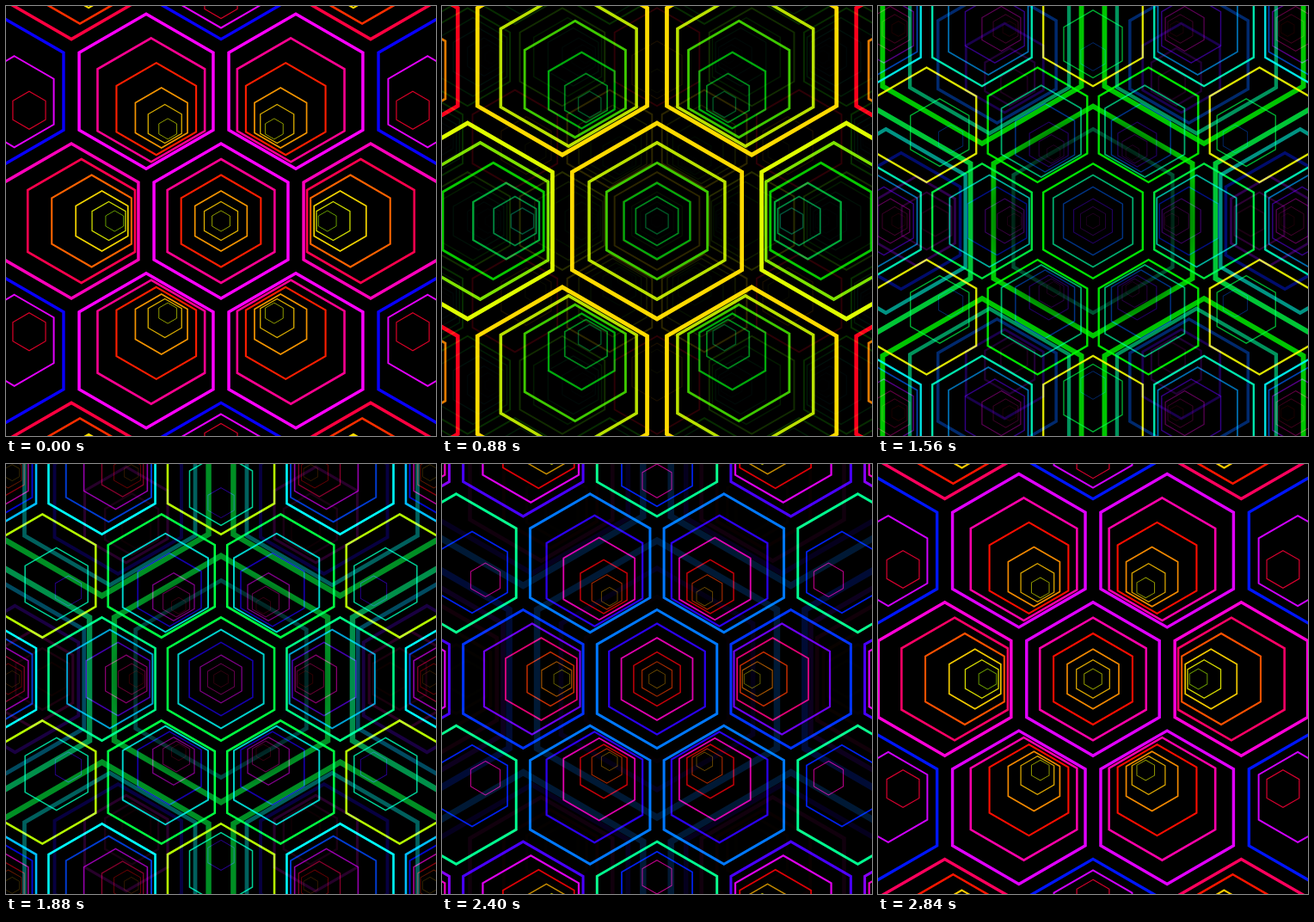
An HTML page with a canvas for the animation above (2.88 s loop, 500 by 500 pixels).

```html
<!DOCTYPE html>
<html lang="en">
<head>
<meta charset="utf-8">
<title>Hexagon tunnel</title>
<style>
html, body { margin: 0; width: 100%; height: 100%; overflow: hidden; background: #000; }
canvas { display: block; width: 500px; height: 500px; }
</style>
</head>
<body>
<canvas id="stage" width="500" height="500"></canvas>
<script>
const ctx = document.getElementById('stage').getContext('2d');
const LOOP = 2880, STEP = 40, SPACING = 174, ROOT3 = Math.sqrt(3);

// Nested rings of one cell, from the rim inwards.
const RINGS = [
  { r: 90, line: 3.5, alpha: 1, hue: 0 },
  { r: 72, line: 2.6, alpha: 1, hue: 30 },
  { r: 53.5, line: 2.1, alpha: 1, hue: 78 },
  { r: 35, line: 1.7, alpha: 0.95, hue: 112 },
  { r: 22.5, line: 1.3, alpha: 0.85, hue: 125 },
  { r: 12, line: 1, alpha: 0.6, hue: 145 }
];
const SPARSE_RINGS = [
  { r: 90, line: 3.4, alpha: 1, hue: 0 },
  { r: 53, line: 2, alpha: 1, hue: 60 },
  { r: 22, line: 1.2, alpha: 0.85, hue: 125 }
];
const RIM_HUES = [[0, 300], [0.15, 360], [0.3, 410], [0.39, 435], [0.54, 480],
  [0.65, 494], [0.72, 525], [0.83, 570], [0.92, 620], [1, 660]];

const clamp = v => Math.max(0, Math.min(1, v));

function rimHue(u) {
  const i = RIM_HUES.findIndex(([at]) => at > u);
  const [a, from] = RIM_HUES[i - 1], [b, to] = RIM_HUES[i];
  return from + (to - from) * (u - a) / (b - a);
}

function makeCells() {
  const cells = [];
  for (let q = -5; q <= 5; q++) {
    for (let r = -5; r <= 5; r++) {
      const norm = q * q + q * r + r * r;
      if (norm > 21) continue;
      const x = SPACING * (q + r / 2), y = SPACING * r * ROOT3 / 2;
      const dist = Math.hypot(x, y) || 1;
      const cell = { x, y, rings: RINGS, hue: 0, dx: -x / dist * 0.645, dy: -y / dist * 0.645 };
      if (norm === 1 && r === 0) cell.hue = 16;
      if (norm === 3) {
        cell.rings = SPARSE_RINGS;
        cell.hue = -58;
      }
      if (norm >= 4) {
        cell.hue = norm === 4 ? 45 : 60;
        cell.dx = -Math.sign(x) * 0.55;
        cell.dy = 0;
      }
      cells.push(cell);
    }
  }
  return cells;
}
const cells = makeCells();

function hexagon(x, y, r) {
  const w = r * ROOT3 / 2;
  ctx.beginPath();
  ctx.moveTo(x, y - r);
  ctx.lineTo(x + w, y - r / 2);
  ctx.lineTo(x + w, y + r / 2);
  ctx.lineTo(x, y + r);
  ctx.lineTo(x - w, y + r / 2);
  ctx.lineTo(x - w, y - r / 2);
  ctx.closePath();
  ctx.stroke();
}

// depthFade dims each ring relative to the one around it.
function drawLattice(scale, u, alpha, depthFade) {
  if (alpha <= 0.005) return;
  const base = rimHue(u);
  const spread = 1 - 0.45 * Math.cos(2 * Math.PI * (u - 0.2));
  const reach = 250 + 95 * scale;
  for (const cell of cells) {
    if (Math.abs(cell.x * scale) > reach || Math.abs(cell.y * scale) > reach) continue;
    cell.rings.forEach((ring, i) => {
      const inset = 90 - ring.r;
      ctx.globalAlpha = alpha * ring.alpha * depthFade ** i;
      ctx.lineWidth = Math.max(0.7, ring.line * scale ** 1.3);
      ctx.strokeStyle = `hsl(${(base + cell.hue + ring.hue * spread) % 360} 100% 50%)`;
      hexagon(250 + (cell.x + cell.dx * inset) * scale,
        250 + (cell.y + cell.dy * inset) * scale, ring.r * scale);
    });
  }
}

// Darkens the middle, where the leaving lattice vanishes first.
function clearMiddle(strength) {
  const shade = ctx.createRadialGradient(250, 250, 80, 250, 250, 128);
  shade.addColorStop(0, '#000');
  shade.addColorStop(1, 'transparent');
  ctx.globalCompositeOperation = 'source-over';
  ctx.globalAlpha = strength;
  ctx.fillStyle = shade;
  ctx.fillRect(0, 0, 500, 500);
}

function draw(time) {
  const u = Math.floor(time % LOOP / STEP) * STEP / LOOP;
  // The zoom doubles per loop; the half-size copy fades in to close it.
  const drift = 0.03 * (Math.sin(Math.PI * u) + 0.35 * Math.sin(2 * Math.PI * u));
  const scale = 2 ** (u + drift);
  const fade = clamp((u - 0.12) / 0.82);
  ctx.globalCompositeOperation = 'source-over';
  ctx.globalAlpha = 1;
  ctx.fillStyle = '#000';
  ctx.fillRect(0, 0, 500, 500);
  ctx.globalCompositeOperation = 'screen';
  drawLattice(scale, u, clamp(1.6 * (1 - fade)), 1 - 0.5 * fade);
  clearMiddle(clamp((fade - 0.25) * 4));
  ctx.globalCompositeOperation = 'screen';
  drawLattice(scale / 2, u, clamp(3.4 * fade * fade), 0.5 + 0.5 * fade);
}

let start;
function tick(now) {
  start ??= now;
  draw(now - start);
  requestAnimationFrame(tick);
}
draw(0);
requestAnimationFrame(tick);
</script>
</body>
</html>
```
